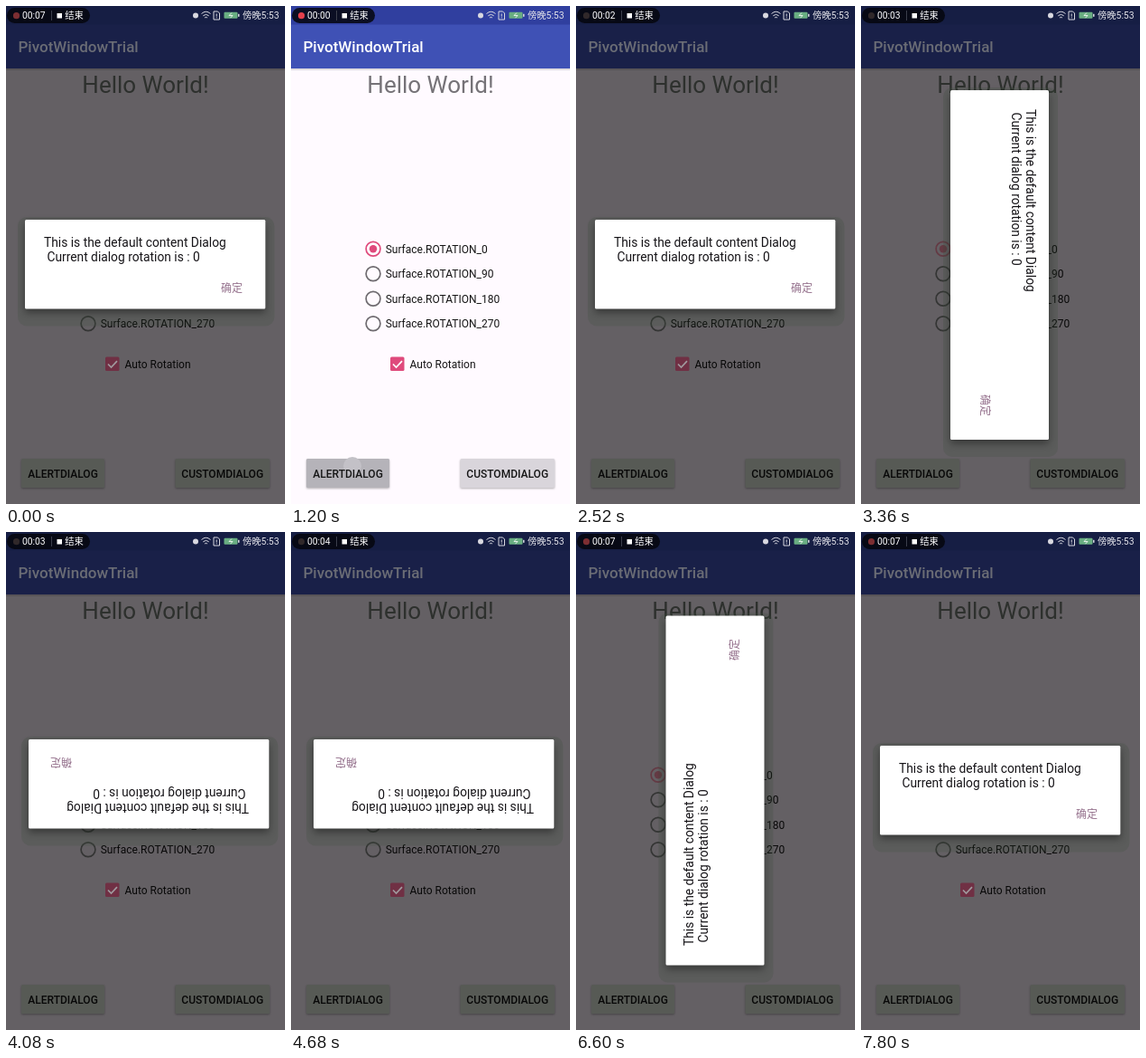
An HTML page for the animation above (7920 ms loop, 309 px wide and 550 px high).

```html
<!DOCTYPE html>
<html lang="en">
<head>
<meta charset="utf-8">
<title>Rotating dialog</title>
<style>
  html, body { margin: 0; width: 100%; height: 100%; overflow: hidden; background: #646064; }
  svg { display: block; width: 100vw; height: 100vh; }
  text { font-family: Roboto, "Noto Sans CJK SC", "Noto Sans CJK", sans-serif; font-size: 12px; white-space: pre; }
  .medium { font-weight: 500; }
  .mid { text-anchor: middle; }
  .status text { font-size: 10.3px; fill: #e4e4ea; }
  .ink { fill: var(--ink); }
  .button { filter: drop-shadow(0 1px 1px rgba(0, 0, 0, .3)); }
  #content text { font-size: 13.8px; fill: #161418; }
  #content .ok { font-size: 12px; font-weight: 500; fill: #95718d; }
  #card { fill: #fff; filter: drop-shadow(0 4px 4px rgba(0, 0, 0, .4)); }
</style>
</head>
<body>
<svg viewBox="0 0 309 550" preserveAspectRatio="none">
  <rect width="309" height="550" fill="var(--page)"/>
  <rect y="69" width="309" height="2" fill="#000" opacity=".12"/>
  <rect width="309" height="69" fill="var(--bar)"/>
  <rect width="309" height="20.5" fill="var(--top)"/>
  <text class="medium" x="13.5" y="51" style="font-size:17px" fill="var(--title)">PivotWindowTrial</text>
  <text class="mid" x="154.5" y="96" style="font-size:26px" fill="var(--hello)">Hello World!</text>

  <g id="radios"></g>

  <rect x="110" y="387.5" width="15.5" height="15.5" rx="1.5" fill="var(--accent)"/>
  <path d="M113 395.5l3.5 3.6 6.5-7" fill="none" stroke="var(--tick)" stroke-width="1.7"/>
  <text class="ink" x="131.5" y="400">Auto Rotation</text>

  <rect class="button" x="17" y="500" width="92" height="32" rx="1.5" fill="var(--button)"/>
  <g id="press">
    <rect x="17" y="500" width="92" height="32" rx="1.5" fill="#b5b3b9"/>
    <circle cx="68" cy="508" r="10" fill="#c3c1c7"/>
  </g>
  <text class="ink medium mid" x="63" y="520.5">ALERTDIALOG</text>
  <rect class="button" x="187.5" y="500" width="104.5" height="32" rx="1.5" fill="var(--button)"/>
  <text class="ink medium mid" x="239.7" y="520.5">CUSTOMDIALOG</text>

  <g class="status">
    <rect x="1" y="2" width="92" height="17" rx="8.5" fill="#05060d" opacity=".85"/>
    <circle id="dot" cx="11.5" cy="10.7" r="3.6"/>
    <text id="clock" x="18" y="14.4" style="fill:#fff"></text>
    <path d="M50.5 5v11" stroke="#3c3f4c"/>
    <rect x="56.5" y="8" width="5.5" height="5.5" fill="#fff"/>
    <text x="65.3" y="14.4" style="fill:#fff">结束</text>
    <circle cx="210" cy="10.5" r="3" fill="#d8d8e0"/>
    <g fill="none" stroke="#d8d8e0">
      <path d="M216.5 8.5q5-4.5 10 0M218.3 10.8q3.2-3 6.4 0M220 13q1.5-1.4 3 0"/>
      <path d="M230 6h4.5l2 2v7H230zM233.2 8.5v3M233.2 12.3v1"/>
    </g>
    <rect x="241.5" y="6.7" width="15" height="7" rx="1" fill="#69ae82"/>
    <path d="M250 7.5l-3 3h4l-2.5 2.7" fill="none" stroke="#fff" stroke-width=".8"/>
    <rect x="257" y="8.8" width="1.5" height="3" fill="#d8d8e0"/>
    <text x="262" y="14.3">傍晚5:53</text>
  </g>

  <g id="dialog">
    <rect id="halo" rx="10" fill="#3c503e" opacity=".22"/>
    <rect id="card" rx="1.5"/>
    <g id="content">
      <text x="21" y="30">This is the default content Dialog</text>
      <text x="21" y="46.2"> Current dialog rotation is : 0</text>
      <text class="ok" y="79.7">确定</text>
    </g>
  </g>
</svg>
<script>
const LOOP = 7920, STEP = 120;
const $ = id => document.getElementById(id);
const clamp = v => Math.max(0, Math.min(1, v));
const set = (el, attrs) => { for (const k in attrs) el.setAttribute(k, attrs[k]); };

// colour of each part: plain, dimmed
const palette = {
  page: ['#fffaff', '#646064'], top: ['#303f9f', '#161e44'], bar: ['#3f51b5', '#192048'],
  title: ['#ffffff', '#6a6c75'], hello: ['#757277', '#2d302d'], ring: ['#6f6b70', '#343534'],
  chosen: ['#df4a7c', '#643a44'], accent: ['#df4a7c', '#703044'], tick: ['#ffffff', '#a09a9e'],
  ink: ['#161616', '#080808'], button: ['#d9d5db', '#575a55']
};

// card box, content origin and turn, label position
const flat = { w: 266.3, h: 98.5, ok: 217 }, tall = { w: 109, h: 386, ok: 336 };
const poses = [
  { ...flat, x: 21, y: 236, ox: 21, oy: 236, turn: 0 },
  { ...tall, x: 99, y: 93, ox: 213, oy: 93, turn: 90 },
  { ...flat, x: 25, y: 229, ox: 290, oy: 330, turn: 180 },
  { ...tall, x: 99.5, y: 92.5, ox: 100, oy: 478, turn: 270 }
];
const turns = [2880, 4080, 6240, 6960];
const seconds = [1320, 2040, 3240, 4320, 5160, 5760, 6480];
const passed = (times, t) => times.filter(s => t >= s).length;

$('radios').innerHTML = [0, 90, 180, 270].map((deg, i) => {
  const y = 268.3 + 27.5 * i, color = `var(--${i ? 'ring' : 'chosen'})`;
  return `<circle cx="91" cy="${y}" r="7.9" fill="none" stroke="${color}" stroke-width="1.7"/>` +
    (i ? '' : `<circle cx="91" cy="${y}" r="4.2" fill="${color}"/>`) +
    `<text class="ink" x="104.7" y="${y + 4.3}">Surface.ROTATION_${deg}</text>`;
}).join('');

function draw(time) {
  let t = Math.floor(time % LOOP / STEP) * STEP;
  if (t < STEP) t = LOOP - STEP;              // the loop opens on its closing picture
  const dim = clamp((t - 1240) / 200);

  for (const name in palette) {
    const [plain, dark] = palette[name];
    document.body.style.setProperty('--' + name, `color-mix(in srgb, ${dark} ${dim * 100}%, ${plain})`);
  }
  set($('press'), { opacity: clamp((t - 840) / 360) * (1 - dim) });
  set($('dot'), { fill: t < 1320 ? '#e5404c' : t < 5160 ? '#30282a' : '#7c2e32' });
  $('clock').textContent = '00:0' + passed(seconds, t);

  const p = poses[passed(turns, t) % 4];
  set($('dialog'), { opacity: dim });
  set($('halo'), { x: p.x - 8, y: p.y - 3, width: p.w + 18, height: p.h + 22 });
  set($('card'), { x: p.x, y: p.y, width: p.w, height: p.h });
  set($('content'), { transform: `translate(${p.ox} ${p.oy}) rotate(${p.turn})` });
  set(document.querySelector('.ok'), { x: p.ok });
}

const start = performance.now();
function tick() {
  draw(performance.now() - start);
  requestAnimationFrame(tick);
}
tick();
</script>
</body>
</html>
```
